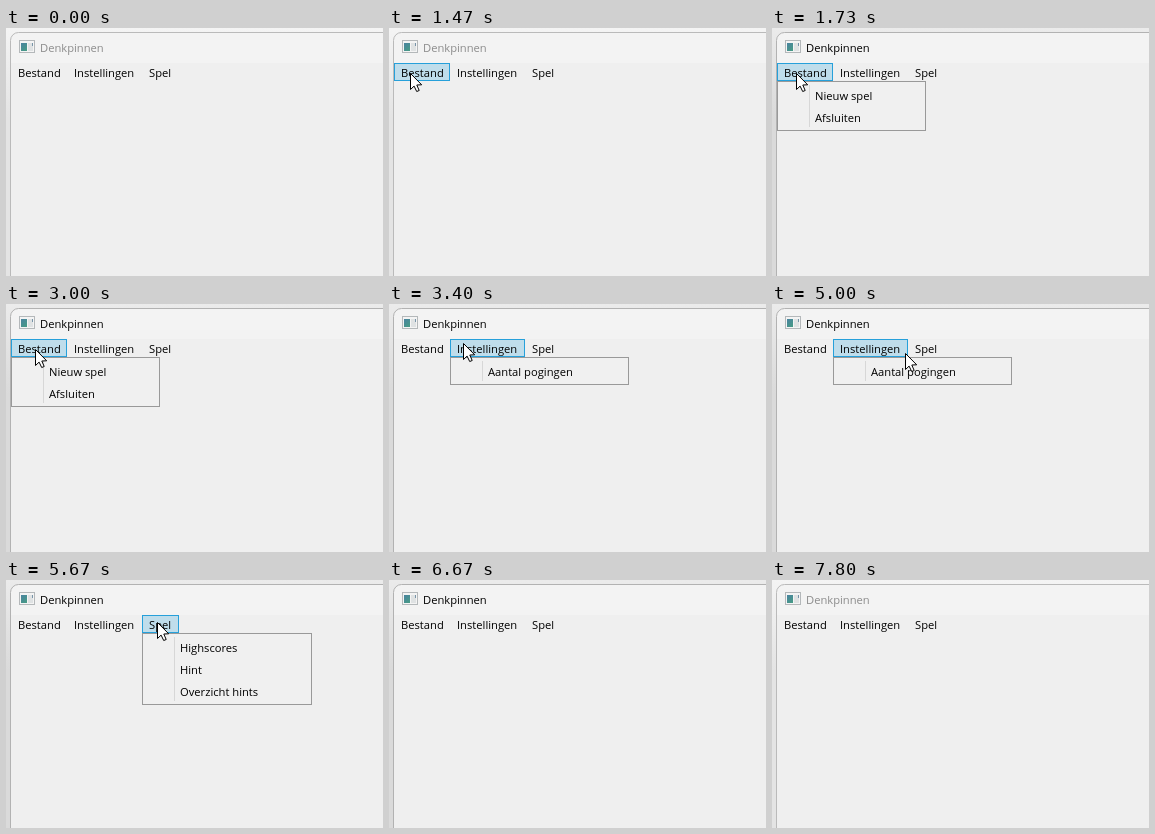
Recreate the animation shown at these times as an HTML page with a canvas. Size 377x248 px, loop 7.94 s.

```html
<!DOCTYPE html>
<html lang="nl">
<head>
<meta charset="utf-8">
<title>Denkpinnen</title>
<style>
  html, body { margin: 0; width: 100%; height: 100%; overflow: hidden; background: #efefef; }
  canvas { display: block; }
</style>
</head>
<body>
<canvas id="stage" width="377" height="248"></canvas>
<script>
const ctx = document.getElementById('stage').getContext('2d', { alpha: false });
const LOOP = 7940;
const TICK = 200 / 3; // the picture advances at 15 steps per second

const menus = [
  { label: 'Bestand', x: 5, width: 56, popup: 149, items: ['Nieuw spel', 'Afsluiten'] },
  { label: 'Instellingen', x: 61, width: 75, popup: 179, items: ['Aantal pogingen'] },
  { label: 'Spel', x: 136, width: 37, popup: 170, items: ['Highscores', 'Hint', 'Overzicht hints'] }
];

// Pointer stops: tick, x, y
const passing = [[3, 349, 246], [4, 320, 245]];
const visiting = [
  [18, 50, 78], [22, 21, 45], [26, 24, 45], [44, 24, 45], [45, 29, 45],
  [51, 74, 39], [68, 74, 39], [75, 133, 49], [80, 151, 48], [85, 151, 42], [99, 151, 42]
];
const OPEN = 24, CLOSE = 94, BLUR = 117;

function pointerAt(tick) {
  const path = tick < 18 ? passing : visiting;
  const next = path.findIndex(stop => stop[0] >= tick);
  if (next < 0 || tick < path[0][0]) return null;
  const [t1, x1, y1] = path[next];
  const [t0, x0, y0] = path[Math.max(0, next - 1)];
  const k = t1 === t0 ? 1 : (tick - t0) / (t1 - t0);
  return { x: Math.round(x0 + (x1 - x0) * k), y: Math.round(y0 + (y1 - y0) * k) };
}

function rect(x, y, w, h, fill) {
  ctx.fillStyle = fill;
  ctx.fillRect(x, y, w, h);
}

function framed(x, y, w, h, fill, border) {
  rect(x, y, w, h, border);
  rect(x + 1, y + 1, w - 2, h - 2, fill);
}

function text(label, x, y, color = '#000') {
  ctx.font = '500 11.2px "Open Sans", "Noto Sans", sans-serif';
  ctx.fillStyle = color;
  ctx.fillText(label, x, y);
}

function drawIcon() {
  framed(13, 12, 16, 13, '#f4f4f4', '#b4b8ba');
  const panel = ctx.createLinearGradient(15, 15, 21, 22);
  panel.addColorStop(0, '#4a83a0');
  panel.addColorStop(1, '#479a86');
  rect(15, 15, 6, 8, panel);
  rect(22, 15, 5, 8, '#dfe2e3');
  rect(26, 15, 1, 3, '#7794a8');
}

function drawWindow(active) {
  const shade = ctx.createLinearGradient(0, 0, 0, 90);
  shade.addColorStop(0, active ? '#ebebeb' : '#f4f4f4');
  shade.addColorStop(1, active ? '#dadada' : '#e4e4e4');
  rect(0, 0, 377, 248, shade);

  ctx.save();
  ctx.beginPath();
  ctx.roundRect(4.5, 4.5, 400, 300, 8);
  ctx.save();
  ctx.clip();
  rect(4, 4, 373, 31, '#f3f3f3');
  rect(4, 35, 373, 213, '#efefef');
  ctx.restore();
  ctx.strokeStyle = active ? '#b2b2b2' : '#bababa';
  ctx.lineWidth = 1;
  ctx.stroke();
  ctx.restore();

  drawIcon();
  text('Denkpinnen', 34, 24, active ? '#000' : '#8c8c8c');
}

function drawPopup({ x, popup, items }) {
  const height = items.length * 22 + 6;
  framed(x, 53, popup, height, '#f0f0f0', '#999');
  rect(x + 32, 57, 1, height - 8, '#d7d7d7');
  items.forEach((item, i) => text(item, x + 38, 72 + i * 22));
}

function drawPointer({ x, y }) {
  ctx.save();
  ctx.translate(x + 0.5, y + 0.5);
  ctx.beginPath();
  [[0, 0], [0, 16], [3.6, 12.6], [6.2, 18], [8.7, 17], [6.3, 11.5], [11.2, 11.3]]
    .forEach(point => ctx.lineTo(...point));
  ctx.closePath();
  ctx.fillStyle = '#fff';
  ctx.fill();
  ctx.strokeStyle = '#000';
  ctx.lineWidth = 1;
  ctx.stroke();
  ctx.restore();
}

function draw(now) {
  const tick = Math.floor((now % LOOP + 7) / TICK);
  const pointer = pointerAt(tick);
  drawWindow(tick >= OPEN && tick < BLUR);

  const hovering = pointer && pointer.y < 53 && tick < CLOSE;
  const current = hovering && menus.find(menu => pointer.x < menu.x + menu.width);
  for (const menu of menus) {
    if (menu === current) framed(menu.x, 35, menu.width, 18, '#bfddeb', '#26a0da');
    text(menu.label, menu.x + 7, 49);
  }
  if (current && tick >= OPEN) drawPopup(current);
  if (pointer) drawPointer(pointer);
}

const start = performance.now();
function frame() {
  draw(performance.now() - start);
  requestAnimationFrame(frame);
}
frame();
</script>
</body>
</html>
```
